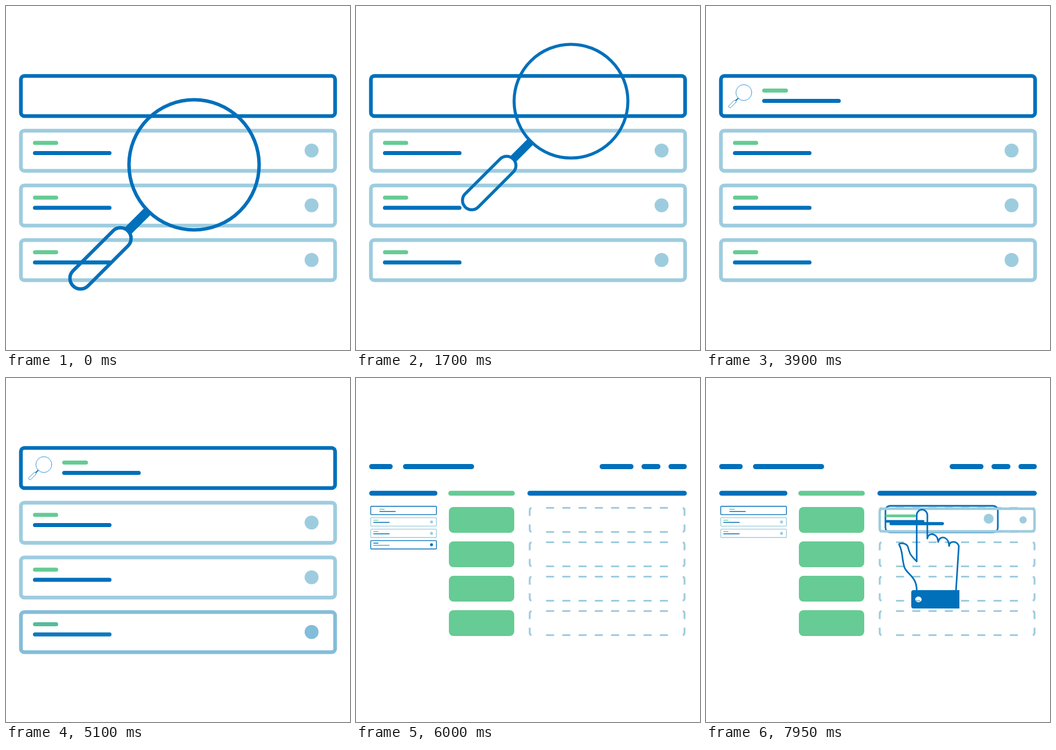
Recreate the animation shown at these times as an HTML page with a canvas. Size 600 by 600 pixels, loop 8 s.

```html
<!DOCTYPE html>
<html lang="en">
<head>
<meta charset="utf-8">
<title>Search and drag</title>
<style>
html, body { margin: 0; width: 100%; height: 100%; overflow: hidden; background: #fff; }
canvas { display: block; width: 100vmin; height: 100vmin; }
</style>
</head>
<body>
<canvas id="stage" width="600" height="600"></canvas>
<script>
const ctx = document.getElementById('stage').getContext('2d');
const LOOP = 8000, STEP = 50;
const BLUE = [0, 112, 187], LIGHT = [158, 204, 223], GREEN = [102, 203, 148], MID = [86, 165, 210];

const rgb = c => `rgb(${c.map(Math.round).join()})`;
const lerp = (a, b, p) => a + (b - a) * p;
const mix = (a, b, p) => a.map((v, i) => lerp(v, b[i], p));
const part = (t, a, b) => Math.min(1, Math.max(0, (t - a) / (b - a)));
const ease = (t, a, b) => { const p = part(t, a, b); return p * p * (3 - 2 * p); };

// Lens centre: time, x, y
const LENS = [
  [0, 328, 277], [400, 366, 285], [850, 396, 255], [1100, 403, 230], [1250, 405.5, 214],
  [1700, 375, 166], [2400, 211, 148], [2550, 174, 148], [3300, 66, 151]
];

function slope(i, k) {
  if (i === LENS.length - 1) return 0;
  const a = LENS[Math.max(0, i - 1)], b = LENS[i + 1];
  return (b[k] - a[k]) / (b[0] - a[0]);
}

function lensAt(t, k) {
  const last = LENS.length - 1;
  if (t >= LENS[last][0]) return LENS[last][k];
  let i = 0;
  while (t >= LENS[i + 1][0]) i++;
  const a = LENS[i], b = LENS[i + 1], h = b[0] - a[0];
  const u = (t - a[0]) / h, u2 = u * u, u3 = u2 * u;
  return (2 * u3 - 3 * u2 + 1) * a[k] + (u3 - 2 * u2 + u) * h * slope(i, k)
    + (3 * u2 - 2 * u3) * b[k] + (u3 - u2) * h * slope(i + 1, k);
}

// Round-capped bar between its outer ends
function bar(x1, x2, y, w, color) {
  if (x2 - x1 < w) return;
  ctx.beginPath();
  ctx.lineCap = 'round';
  ctx.lineWidth = w;
  ctx.strokeStyle = rgb(color);
  ctx.moveTo(x1 + w / 2, y);
  ctx.lineTo(x2 - w / 2, y);
  ctx.stroke();
}

function box(x1, y1, x2, y2, r, w, color) {
  ctx.beginPath();
  ctx.roundRect(x1, y1, x2 - x1, y2 - y1, r);
  ctx.lineWidth = w;
  ctx.strokeStyle = rgb(color);
  ctx.stroke();
}

function dot(x, y, r, color) {
  ctx.beginPath();
  ctx.arc(x, y, r, 0, Math.PI * 2);
  ctx.fillStyle = rgb(color);
  ctx.fill();
}

function row(y, edge, top, line) {
  box(26, y, 574, y + 70, 6, 6.5, edge);
  bar(47, 91, y + 21.3, 7, top);
  bar(47, 184, y + 39, 7, line);
  dot(533, y + 34.7, 12.2, edge);
}

function magnifier(t) {
  const s = lerp(1, 0.122, ease(t, 1200, 3300));
  ctx.save();
  ctx.translate(lensAt(t, 1), lensAt(t, 2));
  ctx.scale(s, s);
  ctx.strokeStyle = rgb(BLUE);
  ctx.lineWidth = 6;
  ctx.beginPath();
  ctx.arc(0, 0, 113.5, 0, Math.PI * 2);
  ctx.stroke();
  ctx.rotate(Math.PI * 0.75);
  ctx.beginPath();
  ctx.roundRect(163, -18.5, 135.5, 37, 18.5);
  ctx.stroke();
  ctx.fillStyle = rgb(BLUE);
  ctx.fillRect(111, -8, 54, 16);
  ctx.restore();
}

function panel(t) {
  const z = ease(t, 5450, 6000), s = lerp(1, 0.2092, z);
  ctx.save();
  ctx.translate(lerp(0, 25 - 22.8 * 0.2092, z), lerp(0, 223 - 118.6 * 0.2092, z));
  ctx.scale(s, s);
  box(26, 122, 574, 192, 6, 6.5, BLUE);
  bar(98, lerp(98, 143, ease(t, 2800, 3400)), 147.6, 7, GREEN);
  bar(98, lerp(98, 235, ease(t, 3200, 3900)), 165.6, 7, BLUE);
  row(217.4, LIGHT, GREEN, BLUE);
  row(312.9, LIGHT, GREEN, BLUE);
  if (t < 6700) {
    const k = part(t, 4000, 6000) ** 3;
    row(408.3, mix(LIGHT, BLUE, k), mix(GREEN, BLUE, k), mix(BLUE, MID, k));
  }
  if (z < 1) magnifier(t);
  ctx.restore();
}

function dashedSlot(y) {
  const x1 = 303, x2 = 573, y2 = y + 42;
  ctx.beginPath();
  ctx.lineCap = 'butt';
  ctx.lineWidth = 3.2;
  ctx.strokeStyle = rgb(LIGHT);
  for (let i = 0; i < 8; i++) {
    const x = 331.5 + i * 28.35;
    for (const v of [y, y2]) {
      ctx.moveTo(x, v);
      ctx.lineTo(x + 14, v);
    }
  }
  for (const [x, d] of [[x1, 3], [x2, -3]]) {
    ctx.moveTo(x, y + 14);
    ctx.lineTo(x, y + 4);
    ctx.quadraticCurveTo(x, y + 1, x + d, y);
    ctx.moveTo(x, y2 - 13);
    ctx.lineTo(x, y2 - 4);
    ctx.quadraticCurveTo(x, y2 - 1, x + d, y2);
  }
  ctx.stroke();
}

function layout(t) {
  ctx.globalAlpha = part(t, 5550, 6000);
  for (const [a, b] of [[23, 64], [82, 206], [425, 484], [498, 531], [545, 577]]) bar(a, b, 154.5, 9, BLUE);
  bar(23, 142, 201, 8.5, BLUE);
  bar(161, 277, 201, 8.5, GREEN);
  bar(299, 577, 201, 8.5, BLUE);
  for (let i = 0; i < 4; i++) {
    const y = 225 + i * 60;
    ctx.beginPath();
    ctx.roundRect(162, y, 114, 45, 8);
    ctx.fillStyle = rgb(GREEN);
    ctx.fill();
    dashedSlot(y + 1.5);
  }
  ctx.globalAlpha = 1;
}

// Vertical sag of the dragged card
const sag = p => 100 * p * (1 - p);

function card(p) {
  const m = (a, b) => lerp(a, b, p);
  ctx.save();
  ctx.translate(0, sag(p));
  box(m(25.7, 313), m(284, 223), m(140.3, 509), m(298.3, 269), m(1.3, 8), m(1.36, 2.8), BLUE);
  bar(m(30, 313), m(39, 366), m(288.3, 240.5), m(1.5, 4.5), mix(BLUE, GREEN, p));
  bar(m(30, 313), m(58, 381), m(292, 250), m(1.5, 4.5), mix(MID, BLUE, p));
  dot(m(131.7, 493), m(291, 245.3), m(2.6, 8.6), mix(BLUE, LIGHT, p));
  ctx.restore();
}

function filledSlot(t) {
  ctx.globalAlpha = part(t, 7700, 7950);
  box(303, 228, 573, 267.5, 5, 4.4, LIGHT);
  bar(320, 366, 240.5, 4.5, GREEN);
  bar(320, 415, 254, 5.5, BLUE);
  dot(553, 247.5, 6.3, LIGHT);
  ctx.globalAlpha = 1;
}

function hand(t, p) {
  const s = lerp(0.58, 1, p);
  ctx.save();
  ctx.globalAlpha = part(t, 6450, 6700);
  ctx.translate(lerp(25, 312, p), lerp(283, 222, p) + sag(p));
  ctx.scale(s, s);
  ctx.translate(-312, -222);
  ctx.strokeStyle = ctx.fillStyle = rgb(BLUE);
  ctx.lineWidth = 2.8;
  ctx.lineJoin = 'round';
  ctx.beginPath();
  ctx.moveTo(367.5, 371);
  ctx.bezierCurveTo(368, 346, 350, 342, 346, 330);
  ctx.bezierCurveTo(341, 314, 344, 304, 337, 291);
  ctx.bezierCurveTo(335, 287, 349, 287, 352, 294);
  ctx.bezierCurveTo(356, 309, 357, 309, 367.5, 320);
  ctx.lineTo(367.5, 239);
  ctx.arc(376.8, 239, 9.3, Math.PI, 0);
  ctx.lineTo(386, 280);
  ctx.bezierCurveTo(387, 269, 404, 269, 405, 286);
  ctx.bezierCurveTo(407, 274, 423, 275, 424, 293);
  ctx.bezierCurveTo(425, 283, 438, 284, 441, 293);
  ctx.lineTo(436, 371);
  ctx.stroke();
  ctx.beginPath();
  ctx.roundRect(358, 370, 84, 32, [4, 0, 0, 4]);
  ctx.moveTo(376, 386.3);
  ctx.ellipse(370.5, 386.3, 5.6, 5, 0, 0, Math.PI * 2);
  ctx.fill('evenodd');
  ctx.restore();
}

function draw(t) {
  ctx.fillStyle = '#fff';
  ctx.fillRect(0, 0, 600, 600);
  if (t > 5550) layout(t);
  panel(t);
  const p = ease(t, 6700, 7500);
  if (t >= 6700) card(p);
  if (t > 7700) filledSlot(t);
  if (t > 6450) hand(t, p);
}

const start = performance.now();
function frame() {
  const t = (performance.now() - start) % LOOP;
  draw(Math.floor(t / STEP) * STEP);
  requestAnimationFrame(frame);
}
frame();
</script>
</body>
</html>
```
